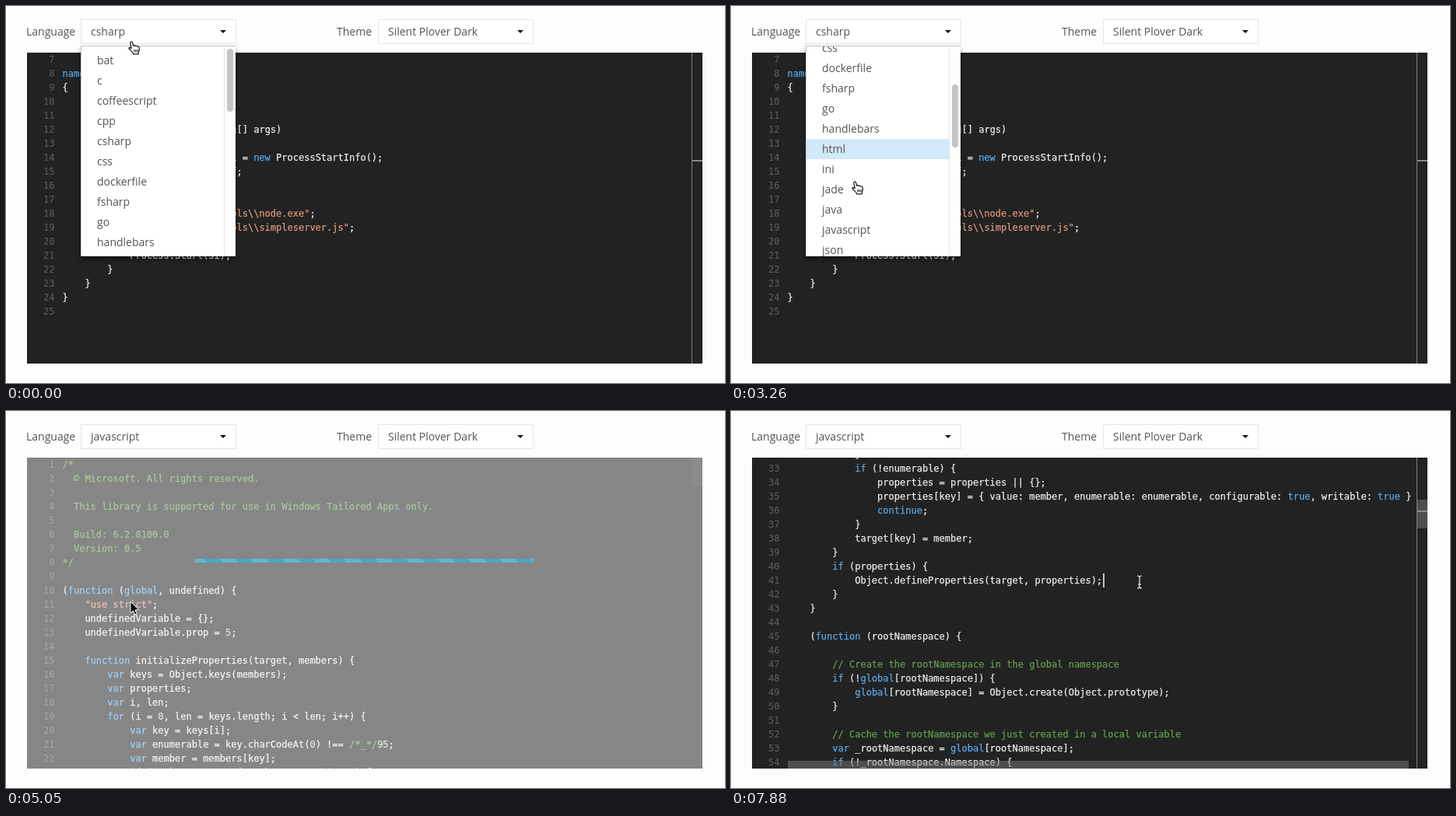
Animation, 924 px wide and 485 px high, one loop 8000 ms. Source, as an HTML page:

```html
<!DOCTYPE html>
<html lang="en">
<head>
<meta charset="utf-8">
<title>Code editor language picker</title>
<style>
  html, body { margin: 0; width: 100%; height: 100%; overflow: hidden; background: #fdfdfd; }
  body { position: relative; font: 14px/32px "Open Sans", sans-serif; color: #555; }
  div, pre, svg { position: absolute; margin: 0; box-sizing: border-box; }
  .label, .select { top: 17px; white-space: nowrap; }
  .select { width: 200px; height: 32px; padding-left: 12px; line-height: 30px; background: #fff; border: 1px solid #e5e5e5; }
  .select::after { content: ""; position: absolute; left: 178px; top: 13px; border: 4px solid transparent; border-top-color: #111; border-bottom: 0; }
  #editor { left: 27px; top: 60px; width: 868px; height: 400px; overflow: hidden; background: #222; }
  pre { font: 12px/18px "DejaVu Sans Mono", monospace; }
  .nums { left: 0; width: 35.5px; text-align: right; color: #5f5f5f; }
  .code { left: 45.5px; color: #ececec; -webkit-text-stroke: .25px; }
  .comment { color: #629a4e; }
  .string { color: #d8967a; }
  .keyword { color: #5aa5e4; }
  .number { color: #b5cea8; }
  #ruler { left: 854px; top: 0; width: 14px; height: 400px; border-left: 1px solid #7f7f7f; }
  #mark { left: 0; width: 13px; height: 2px; background: #8a8a8a; }
  #vbar { left: 854px; width: 14px; height: 37px; background: rgba(125, 121, 123, .48); }
  #hbar { left: 46px; top: 390px; width: 798px; height: 10px; background: rgba(121, 121, 121, .5); }
  #caret { left: 451px; width: 2px; height: 18px; background: #c4c4c4; }
  #veil { left: 0; top: 0; width: 868px; height: 400px; background: rgba(255, 255, 255, .45); }
  #bar { left: 216px; top: 130px; width: 435px; height: 5px; background: #48a8c4
    linear-gradient(45deg, rgba(255,255,255,.15) 25%, transparent 25% 50%, rgba(255,255,255,.15) 50% 75%, transparent 75%) 0 0 / 40px 40px; }
  #menu { left: 96px; top: 51px; width: 199px; height: 271px; overflow: hidden; background: #fff; border: 1px solid #c8c8c8; border-width: 1px 0 0 1px; }
  #shadow { left: 96px; top: 51px; width: 199px; height: 271px; box-shadow: 0 4px 6px rgba(0, 0, 0, .4); }
  #list { left: 0; width: 183px; }
  .item { left: 0; width: 183px; height: 26px; padding-left: 20px; line-height: 26px; }
  .item.on { background: #d2e9f9; }
  #track { left: 183px; top: 0; width: 15px; height: 270px; background: #fdfdfd; border-left: 1px solid #e3e3e3; }
  #thumb { left: 187px; width: 8px; height: 81px; border-radius: 4px; background: #c4c4c4; }
  svg { left: 0; top: 0; overflow: visible; width: 20px; height: 20px; }
</style>
</head>
<body>
<div class="label" style="left:26px">Language</div>
<div class="select" style="left:96px" id="language"></div>
<div class="label" style="left:425px">Theme</div>
<div class="select" style="left:478px">Silent Plover Dark</div>

<div id="editor">
  <div id="csharp"></div>
  <div id="js"></div>
  <div id="caret"></div>
  <div id="vbar"></div>
  <div id="ruler"><div id="mark"></div></div>
  <div id="hbar"></div>
  <div id="veil"><div id="bar"></div></div>
</div>

<div id="dropdown">
  <div id="shadow"></div>
  <div id="menu">
    <div id="list"></div>
    <div id="track"></div>
    <div id="thumb"></div>
  </div>
</div>

<svg id="hand"><path fill="#fff" stroke="#111" stroke-width="1.2" stroke-linejoin="round" d="M4.2 9.6L2.8 2.8C2.5.7 5 .3 5.5 2.2L6.8 6.4C7.5 5.3 9 5.5 9.3 6.6 10.2 5.8 11.5 6.2 11.8 7.2 12.9 6.7 14 7.3 14.2 8.6 14.8 11 14.3 12.4 13.3 14L13.2 16.8H6.6C6.4 15 4 13 1.2 10 .3 8.7 1.8 7.9 2.8 8.7Z"/><path stroke="#111" d="M7.8 11v3.5M9.8 11v3.5M11.8 11v3.5"/></svg>
<svg id="arrow"><path stroke="#fff" d="M0 0V15L3.4 11.8 5.8 17 8.2 16 5.8 11H10.5Z"/></svg>
<svg id="beam"><g fill="none"><path id="beamEdge" stroke="#222" stroke-width="3" d="M-3-8Q0-8 0-6Q0-8 3-8M0-6V6M-3 8Q0 8 0 6Q0 8 3 8M-2 3H2"/><path stroke="#f4f4f4" stroke-width="1.2" d="M-3-8Q0-8 0-6Q0-8 3-8M0-6V6M-3 8Q0 8 0 6Q0 8 3 8M-2 3H2"/></g></svg>

<script>
const $ = id => document.getElementById(id);

const csharp = String.raw`
namespace VS
{
    class Program
    {
        static void Main(string[] args)
        {
            ProcessStartInfo si = new ProcessStartInfo();
            float load= 3.2e02f;


            si.FileName = @"tools\\node.exe";
            si.Arguments = "tools\\simpleserver.js";

            Process.Start(si);
        }
    }
}
`;

const js = `/*
  © Microsoft. All rights reserved.

  This library is supported for use in Windows Tailored Apps only.

  Build: 6.2.8100.0
  Version: 0.5
*/

(function (global, undefined) {
    "use strict";
    undefinedVariable = {};
    undefinedVariable.prop = 5;

    function initializeProperties(target, members) {
        var keys = Object.keys(members);
        var properties;
        var i, len;
        for (i = 0, len = keys.length; i < len; i++) {
            var key = keys[i];
            var enumerable = key.charCodeAt(0) !== /*_*/95;
            var member = members[key];
            if (member && typeof member === 'object') {
                if (member.value !== undefined || typeof member.get === 'function' || typeof member.set === 'function') {
                    if (member.enumerable === undefined) {
                        member.enumerable = enumerable;
                    }
                    properties = properties || {};
                    properties[key] = member;
                    continue;
                }
            }
            if (!enumerable) {
                properties = properties || {};
                properties[key] = { value: member, enumerable: enumerable, configurable: true, writable: true }
                continue;
            }
            target[key] = member;
        }
        if (properties) {
            Object.defineProperties(target, properties);
        }
    }

    (function (rootNamespace) {

        // Create the rootNamespace in the global namespace
        if (!global[rootNamespace]) {
            global[rootNamespace] = Object.create(Object.prototype);
        }

        // Cache the rootNamespace we just created in a local variable
        var _rootNamespace = global[rootNamespace];
        if (!_rootNamespace.Namespace) {`;

const token = /(?<comment>\/\*[\s\S]*?\*\/|\/\/.*)|(?<string>@?"[^"\n]*"|'[^'\n]*')|(?<keyword>\b(?:namespace|class|static|void|string|new|float|function|global|var|for|if|typeof|continue|true)\b)|(?<number>\b\d[\w.]*)/g;

function add(parent, tag, cls, text) {
  const el = document.createElement(tag);
  el.className = cls;
  el.textContent = text;
  return parent.appendChild(el);
}

function fillCode(box, text, first) {
  const count = text.split("\n").length;
  add(box, "pre", "nums", Array.from({ length: count }, (_, i) => first + i).join("\n"));
  const pre = add(box, "pre", "code", "");
  let pos = 0;
  for (const m of text.matchAll(token)) {
    pre.append(text.slice(pos, m.index));
    add(pre, "span", Object.keys(m.groups).find(k => m.groups[k]), m[0]);
    pos = m.index + m[0].length;
  }
  pre.append(text.slice(pos));
}

fillCode($("csharp"), csharp, 7);
fillCode($("js"), js, 1);

const names = "bat c coffeescript cpp csharp css dockerfile fsharp go handlebars html ini jade java javascript json less lua markdown objective-c php plaintext".split(" ");
const items = names.map((name, i) => {
  const el = add($("list"), "div", "item", name);
  el.style.top = 5 + i * 26 + "px";
  return el;
});

// Time runs in ticks; each track lists [tick, values...].
const LOOP = 8000, TICK = 148.5, PICK = 31, LOADED = 34, BEAM = 36, CLICK = 52;
const tracks = {
  pointer: [[0, 157, 45], [3, 156, 100], [4, 156, 100], [7, 155, 165], [8, 155, 165], [9, 155, 177],
    [12, 155, 177], [16, 155, 225], [26, 155, 225], [27, 155, 232], [29, 155, 244], [30, 155, 244],
    [31, 160, 245], [35, 160, 245], [37, 273, 257], [45, 273, 257], [46, 290, 255], [47, 290, 255],
    [48, 330, 246], [50, 480, 224], [51, 525, 220]],
  menu: [[17, 0], [18, 13], [19, 45], [20, 80], [21, 115], [22, 146], [23, 168], [24, 179]],
  code: [[38, 0], [39, 23], [40, 170], [41, 350], [42, 490], [43, 564], [44, 571]],
  veil: [[30, 0], [31, 1], [34, 1], [35, .6], [36, .25], [37, 0]]
};

function at(name, tick) {
  const keys = tracks[name];
  const n = keys.findIndex(k => k[0] > tick);
  if (n === 0) return keys[0].slice(1);
  if (n < 0) return keys[keys.length - 1].slice(1);
  const a = keys[n - 1], b = keys[n], p = (tick - a[0]) / (b[0] - a[0]);
  return a.slice(1).map((v, i) => v + (b[i + 1] - v) * p);
}

const show = (id, on) => { $(id).style.display = on ? "" : "none"; };
const place = (id, x, y) => { $(id).style.transform = `translate(${x}px, ${y}px)`; };

function draw(tick) {
  const open = tick < PICK, loaded = tick >= LOADED;
  const [x, y] = at("pointer", tick);
  const [menuY] = at("menu", tick);
  const [codeY] = at("code", tick);
  const [veil] = at("veil", tick);

  $("language").textContent = open ? "csharp" : "javascript";
  show("dropdown", open);
  place("list", 0, -Math.round(menuY));
  place("thumb", 0, 3 + Math.round(menuY * .318));
  // Hover lags one tick behind the scroll.
  const hover = Math.floor((y + 1 - 57 + at("menu", tick - 1)[0]) / 26);
  items.forEach((el, i) => el.classList.toggle("on", i === hover));

  show("csharp", !loaded);
  show("js", loaded);
  place("js", 0, -Math.round(codeY));
  show("vbar", loaded);
  $("vbar").style.opacity = tick < BEAM ? .3 : 1;
  place("vbar", 0, Math.round(codeY * .0945));
  show("hbar", tick >= 46);
  show("ruler", !loaded || tick >= CLICK);
  place("mark", 0, loaded ? 68 : 138);
  show("caret", tick >= CLICK);
  place("caret", 0, 40 * 18 - Math.round(codeY));

  show("veil", veil > 0);
  $("veil").style.opacity = veil;
  $("bar").style.backgroundPositionX = -(tick - PICK) * TICK / 50 + "px";

  const kind = open ? "hand" : tick < BEAM ? "arrow" : "beam";
  for (const id of ["hand", "arrow", "beam"]) show(id, id === kind);
  place(kind, Math.round(x), Math.round(y));
}

const start = performance.now();
let last = -1;
function frame() {
  const time = Math.max(0, performance.now() - start) % LOOP;
  const tick = Math.min(53, Math.floor((time + 8) / TICK));
  if (tick !== last) draw(last = tick);
  requestAnimationFrame(frame);
}
frame();
</script>
</body>
</html>
```
